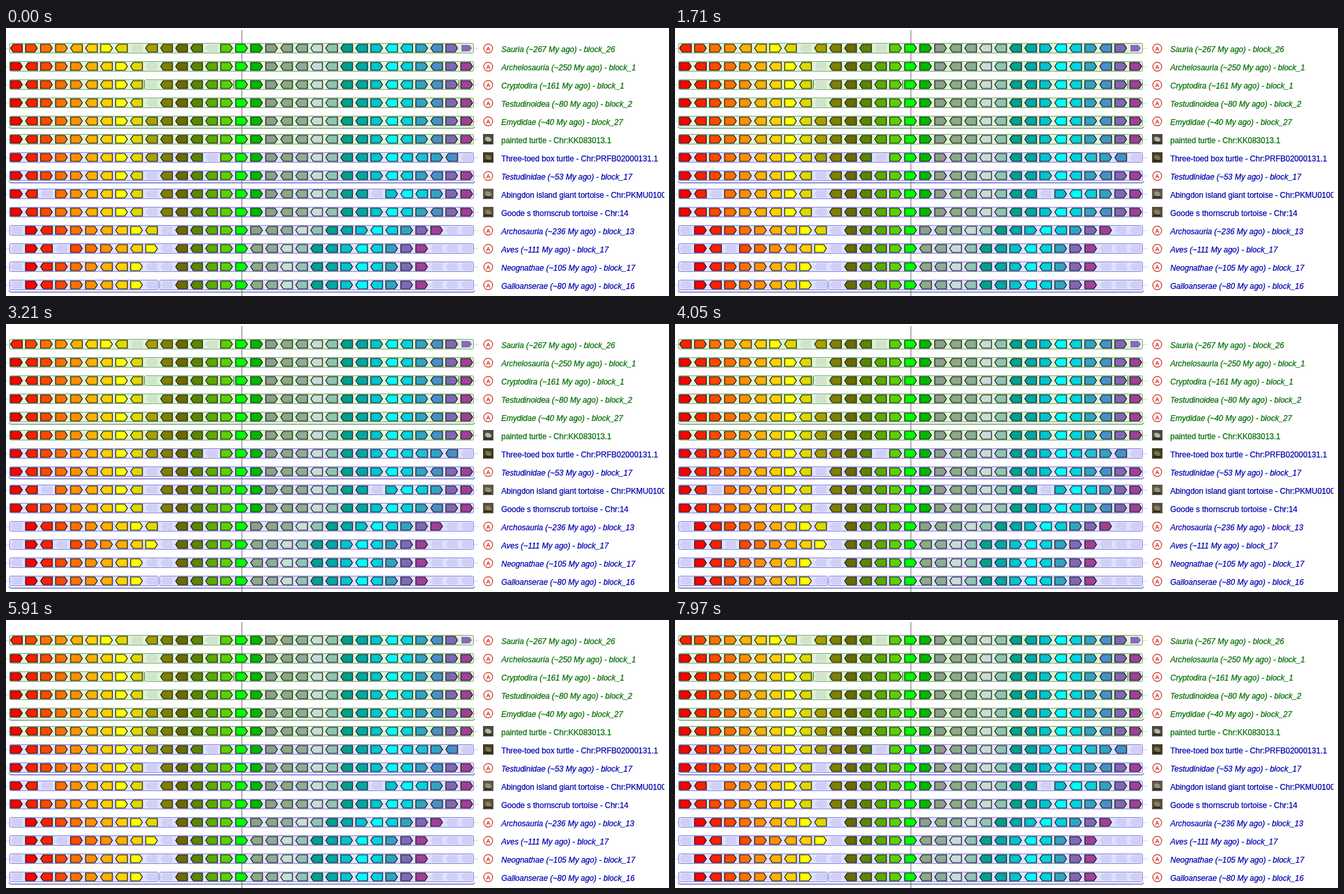
An HTML page with a canvas that plays this animation: 1016x412 px, repeating every 7.99 s.

```html
<!DOCTYPE html>
<html lang="en">
<head>
<meta charset="utf-8">
<title>Gene order comparison</title>
<style>
html, body { margin: 0; width: 100%; height: 100%; overflow: hidden; background: #fff; }
canvas { display: block; }
</style>
</head>
<body>
<canvas id="stage" width="1016" height="412"></canvas>
<script>
const ctx = document.getElementById('stage').getContext('2d');

const PITCH = 23, FIRST_X = 16, ROW_GAP = 28, FIRST_Y = 31;
const FULL = [[6, 716]];

// Each gene letter maps to a colour; LEFT lists those pointing left.
const KEYS = 'abcdefghijklmnopqrstuvwxyzABCDEF';
const COLORS = ('f00 ff2000 ff4800 ff7000 ff9000 ffb000 ffd000 ff0 e0d800 a8a000 ' +
  '808000 6b6b00 5c8500 5cab00 5cd000 0f0 00b800 8ca08c 8caa84 8cae98 c8dcd8 ' +
  '90c4b4 00a090 00a8a8 00c4d0 0ff 00d4e0 30a4c4 4890c8 8068b8 a04098 20c0d8').split(' ');
const LEFT = 'bfgijklmnstuvwxzACF';

const COMMON = 'abcdefghi.klmnopqrstuvwxyzABCDE';
const WITH_J = COMMON.replace('.', 'j');
const BIRDS = '.abcdefgh..lmnopstuvwxyzABDE...';

const rows = [
  { label: 'Sauria (~267 My ago) - block_26', genes: 'bcdefghi.jklm.opqrstuvwxyzABCD*' },
  { label: 'Archelosauria (~250 My ago) - block_1', genes: COMMON },
  { label: 'Cryptodira (~161 My ago) - block_1', genes: COMMON,
    boxes: [[6, 211], [213, 348], [350, 693], [695, 716]] },
  { label: 'Testudinoidea (~80 My ago) - block_2', genes: COMMON },
  { label: 'Emydidae (~40 My ago) - block_27', genes: WITH_J, underline: true },
  { label: 'painted turtle - Chr:KK083013.1', genes: WITH_J, photo: ['#4c4844', '#b8b4a0'] },
  { label: 'Three-toed box turtle - Chr:PRFB02000131.1', genes: 'abcdefghijklm.opqrstuvwxyzAFBC.',
    photo: ['#3c4028', '#807048'] },
  { label: 'Testudinidae (~53 My ago) - block_17', genes: COMMON, underline: true },
  { label: 'Abingdon island giant tortoise - Chr:PKMU010001', genes: 'ab.defghi.klmnopqrstuvwx.yzABDE',
    photo: ['#5c584c', '#989078'] },
  { label: 'Goode s thornscrub tortoise - Chr:14', genes: COMMON, photo: ['#58503c', '#8c7c60'] },
  { label: 'Archosauria (~236 My ago) - block_13', genes: '.abcdefghi.lmnoprstuvwxyzABDE..' },
  { label: 'Aves (~111 My ago) - block_17', genes: '.ab.cdefgh.lmnopstuvwxyzABDE...' },
  { label: 'Neognathae (~105 My ago) - block_17', genes: BIRDS },
  { label: 'Galloanserae (~80 My ago) - block_16', genes: BIRDS, boxes: [[6, 233], [236, 716]], underline: true }
];

const GREEN = { text: '#006c00', fill: '#e0f2d8', edge: '#70ac70', gap: '#d0e4cc', rule: '#206820' };
const BLUE = { text: '#0000b0', fill: '#e0e0ff', edge: '#8484e4', gap: '#d0d0f6', rule: '#2020a0' };

function line(points, color, width = 1) {
  ctx.beginPath();
  points.forEach(([x, y]) => ctx.lineTo(x, y));
  ctx.strokeStyle = color;
  ctx.lineWidth = width;
  ctx.stroke();
}

function arrow(x, y, dir, fill, edge, w = 9, h = 6) {
  ctx.beginPath();
  ctx.moveTo(x - dir * w, y - h);
  ctx.lineTo(x + dir * (w - 4), y - h);
  ctx.lineTo(x + dir * w, y);
  ctx.lineTo(x + dir * (w - 4), y + h);
  ctx.lineTo(x - dir * w, y + h);
  ctx.closePath();
  ctx.fillStyle = fill;
  ctx.fill();
  if (edge) {
    ctx.strokeStyle = edge;
    ctx.lineWidth = 1.2;
    ctx.stroke();
  }
}

function drawTrack(row, y, theme) {
  line([[0, y + .5], [724, y + .5]], '#d4d4dc');
  for (const [x0, x1] of row.boxes || FULL) {
    ctx.beginPath();
    ctx.roundRect(x0 - .5, y - 7.5, x1 - x0 + 1, 15, 2);
    ctx.fillStyle = theme.fill;
    ctx.fill();
    ctx.strokeStyle = theme.edge;
    ctx.lineWidth = 1;
    ctx.stroke();
  }
  if (row.underline) {
    line([[4.5, y + 8.5], [6.5, y + 11], [716.5, y + 11], [718.5, y + 8.5]], theme.rule);
  }
}

function drawGenes(row, y, theme) {
  [...row.genes].forEach((key, i) => {
    const x = FIRST_X + i * PITCH;
    if (key === '.') arrow(x, y, -1, theme.gap);
    else if (key === '*') arrow(x, y, 1, '#8a68c0', null, 8, 5);
    else arrow(x, y, LEFT.includes(key) ? -1 : 1, '#' + COLORS[KEYS.indexOf(key)], '#101008');
  });
}

function drawPhoto([back, shell], y) {
  ctx.fillStyle = back;
  ctx.fillRect(731, y - 8, 16, 16);
  ctx.fillStyle = shell;
  ctx.beginPath();
  ctx.ellipse(739, y, 5, 3.5, .4, 0, 7);
  ctx.fill();
  ctx.fillStyle = '#28241c';
  ctx.fillRect(733, y + 4, 11, 2);
}

function drawBadge(y) {
  ctx.beginPath();
  ctx.arc(739, y + .5, 6.8, 0, 7);
  ctx.strokeStyle = '#cc3020';
  ctx.lineWidth = 1.2;
  ctx.stroke();
  ctx.fillStyle = '#cc2010';
  ctx.font = 'bold 9px "Liberation Sans", Arial, sans-serif';
  ctx.textAlign = 'center';
  ctx.fillText('A', 739, y + 3.8);
}

function drawLabel(row, y, theme) {
  ctx.save();
  ctx.beginPath();
  ctx.rect(755, 0, 254, 412);
  ctx.clip();
  ctx.textAlign = 'left';
  ctx.font = (row.photo ? '' : 'italic ') + '12px "Liberation Sans", Arial, sans-serif';
  ctx.fillStyle = ctx.strokeStyle = theme.text;
  ctx.lineWidth = .25;
  ctx.fillText(row.label, 759, y + 6);
  ctx.strokeText(row.label, 759, y + 6);
  ctx.restore();
}

function draw() {
  ctx.fillStyle = '#fff';
  ctx.fillRect(0, 0, 1016, 412);
  const each = fn => rows.forEach((row, i) => fn(row, FIRST_Y + i * ROW_GAP, i < 6 ? GREEN : BLUE));
  each(drawTrack);
  line([[361.5, 3], [361.5, 412]], '#707070');
  each((row, y, theme) => {
    drawGenes(row, y, theme);
    if (row.photo) drawPhoto(row.photo, y);
    else drawBadge(y);
    drawLabel(row, y, theme);
  });
  requestAnimationFrame(draw);
}

draw();
</script>
</body>
</html>
```
